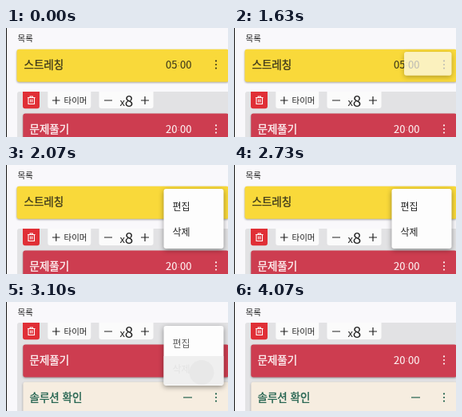
Write an HTML page that moves like this. It is 278x137 px and loops after 4710 ms.

```html
<!DOCTYPE html>
<html lang="ko">
<head>
<meta charset="utf-8">
<title>목록</title>
<style>
html, body { margin: 0; width: 100%; height: 100%; overflow: hidden; background: #f9f8fb; }
svg { display: block; width: 278px; height: 137px; }
text { font-family: "Noto Sans CJK KR", "Noto Sans CJK", "Noto Sans", sans-serif; fill: #222; }
.name, .time { fill: var(--ink); stroke: var(--ink); }
.name { font-size: 13.5px; stroke-width: .4; }
.time { font-size: 13px; stroke-width: .15; }
.colon { font-size: 8px; fill: var(--ink); opacity: .6; }
.small { font-size: 10.5px; }
.item { font-size: 12px; }
.card { filter: drop-shadow(0 1px 1px rgba(0,0,0,.35)); }
.line { fill: none; stroke: #222; stroke-width: 1.2; }
.ink { stroke: var(--ink); }
.dots { fill: var(--ink); }
.btn { fill: #fbfbfb; }
#menu { filter: drop-shadow(0 2px 3px rgba(0,0,0,.4)); }
</style>
</head>
<body>
<svg viewBox="0 0 278 137">
  <defs>
    <clipPath id="view"><rect y="26" width="278" height="111"/></clipPath>
    <clipPath id="grow"><rect id="growBox" y="30" rx="3"/></clipPath>
    <clipPath id="row"><rect x="197" y="68" width="76" height="36"/></clipPath>
    <g id="dots"><circle cy="-4.6" r="1.1"/><circle r="1.1"/><circle cy="4.6" r="1.1"/></g>
    <g id="clock">
      <text class="colon" x="214.9" y="3">:</text>
    </g>
  </defs>
  <rect width="278" height="137" fill="#f9f8fb"/>
  <text class="small" x="14.5" y="17">목록</text>

  <g clip-path="url(#view)">
    <g id="first" style="--ink:#423d1c">
      <rect class="card" x="13.5" y="26.7" width="265.5" height="41" rx="3" fill="#f9d93a"/>
      <text class="name" x="22.5" y="51">스트레칭</text>
      <text class="time" x="200" y="50.5">05</text>
      <use href="#clock" y="46"/>
      <text class="time" x="218" y="50.5">00</text>
      <use class="dots" href="#dots" x="263" y="46"/>
    </g>

    <g id="group">
      <rect x="14" y="80" width="270" height="140" rx="3" fill="#e2e2e4"/>
      <path d="M21 80H42V98.3a3 3 0 0 1-3 3H24a3 3 0 0 1-3-3Z" fill="#e02f36"/>
      <path class="line" style="stroke:#fff;stroke-width:1.1" d="M27 87.5H36.5M30.2 87V86H33.3V87M28 88V95.5H35.5V88M30.7 89.5V93.5M32.8 89.5V93.5"/>
      <path class="btn" d="M52.3 80H106.3V98a3 3 0 0 1-3 3H55.3a3 3 0 0 1-3-3Z"/>
      <path class="line" d="M58 91H67.5M62.8 86.3V95.7"/>
      <text class="small" x="72.5" y="95">타이머</text>
      <path class="btn" d="M116.5 80H184.5V98a3 3 0 0 1-3 3H119.5a3 3 0 0 1-3-3Z"/>
      <path class="line" d="M123 91H133M169 91H179M174 86V96"/>
      <text x="142.5" y="98" font-size="13">x</text>
      <text x="148.7" y="98.5" font-size="19">8</text>

      <g style="--ink:#fdf0f1">
        <rect class="card" x="21.3" y="107.6" width="257.7" height="41" rx="3" fill="#cd3d50"/>
        <text class="name" x="29.5" y="132">문제풀기</text>
        <text class="time" x="200" y="131.5">20</text>
        <use href="#clock" y="127"/>
        <text class="time" x="218" y="131.5">00</text>
        <use class="dots" href="#dots" x="263" y="127"/>
      </g>

      <g style="--ink:#23634f">
        <rect class="card" x="21.3" y="154.6" width="257.7" height="41" rx="3" fill="#f6ede0"/>
        <text class="name" x="29.5" y="179">솔루션 확인</text>
        <path class="line ink" d="M222 174H233"/>
        <use class="dots" href="#dots" x="263" y="174"/>
      </g>
    </g>
  </g>
  <rect width="1" height="137" fill="#161616"/>

  <g id="menu">
    <g clip-path="url(#grow)">
      <rect x="197" y="30" width="76" height="75" fill="#fdfdfd"/>
      <g clip-path="url(#row)">
        <rect id="press" x="197" y="68" width="76" height="36" fill="#ececec"/>
        <circle id="ripple" cx="245" cy="88.5" fill="#bbb"/>
      </g>
      <text class="item" id="edit" x="208.5" y="56.7">편집</text>
      <text class="item" id="remove" x="208.5" y="89.2">삭제</text>
    </g>
  </g>
</svg>
<script>
const LOOP = 4710, OPEN = 1563, TAP = 2870, CLOSE = 2920, SPAN = 300;
const MENU = { right: 272.5, w: 75, h: 75 };
const UNIT = 1 / 3.5;
const $ = id => document.getElementById(id);
const ramp = (v, a, b) => Math.min(1, Math.max(0, (v - a) / (b - a)));

// Menu progress: linear open, then a short hold before it shrinks away.
function menuValue(t) {
  if (t < CLOSE) return ramp(t, OPEN, OPEN + SPAN);
  return 1 - ramp(t, CLOSE + SPAN / 3, CLOSE + SPAN);
}

function drawMenu(t) {
  const v = menuValue(t);
  const w = MENU.w * ramp(v, 0, UNIT);
  const box = $('growBox');
  $('menu').style.display = v > 0 ? '' : 'none';
  $('menu').style.opacity = ramp(v, 0, 1 / 3);
  box.setAttribute('x', MENU.right - w);
  box.setAttribute('width', w);
  box.setAttribute('height', MENU.h * ramp(v, 0, UNIT * 2));
  $('edit').style.opacity = ramp(v, UNIT, UNIT * 2.5);
  $('remove').style.opacity = ramp(v, UNIT * 2, 1);
  const p = ramp(t, TAP, TAP + SPAN);
  $('press').style.opacity = p;
  $('ripple').setAttribute('r', p * 20);
  $('ripple').style.opacity = 0.6 * (1 - p);
}

function draw(t) {
  const removed = t >= TAP;
  $('first').style.display = removed ? 'none' : '';
  $('group').setAttribute('transform', `translate(0 ${removed ? -54 : 0})`);
  drawMenu(t);
}

const start = performance.now();
function tick() {
  draw((performance.now() - start) % LOOP);
  requestAnimationFrame(tick);
}
draw(0);
requestAnimationFrame(tick);
</script>
</body>
</html>
```
